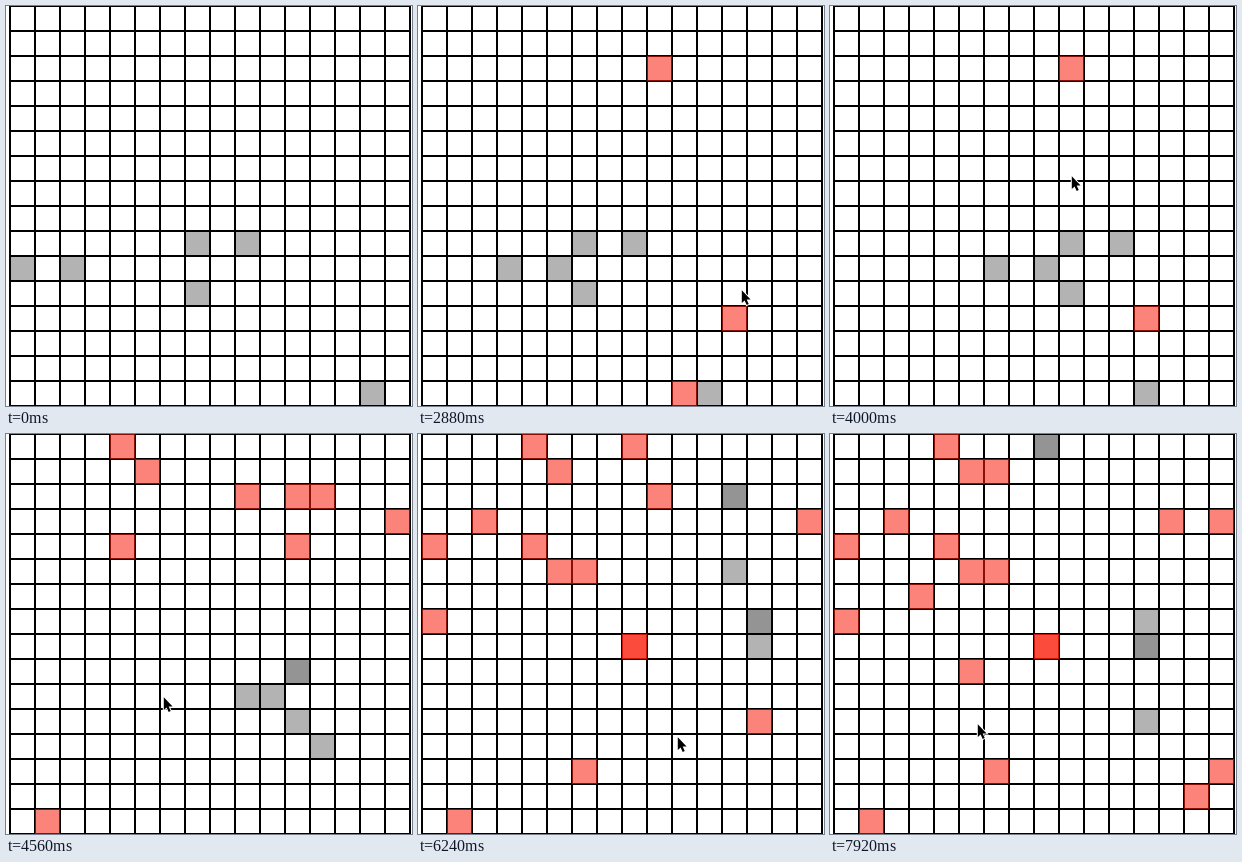
Write an HTML page that moves like this. It is 406 by 400 pixels and loops after 7.99 s.

```html
<!DOCTYPE html>
<html lang="en">
<head>
<meta charset="utf-8">
<title>Foraging grid</title>
<style>
  html, body { margin: 0; width: 100%; height: 100%; overflow: hidden; background: #fff; }
  svg { display: block; }
</style>
</head>
<body>
<svg width="406" height="400" viewBox="0 0 406 400">
  <g shape-rendering="crispEdges">
    <g id="walkers" fill="#808080" fill-opacity=".6"></g>
    <path id="grid" stroke="#000" stroke-width="2"/>
    <g id="food" fill="#fa1e0b" fill-opacity=".55"></g>
  </g>
  <g id="ring" fill="none">
    <circle cx="329.5" cy="313.8" r="21.3" stroke="#fff" stroke-width="4"/>
    <circle cx="329.5" cy="313.8" r="21.3" stroke="#000" stroke-width="1.5"/>
  </g>
  <path id="cursor" d="M.8 1.2V14L3.6 11.4L5.7 16L7.7 15.1L5.7 10.6H9.6Z" stroke="#fff" stroke-width="2" paint-order="stroke"/>
</svg>
<script>
const LOOP = 7990, FRAME = 70, SIZE = 25, LEFT = 4, COUNT = 16;
const TICK = 298, FIRST = 1950;
const $ = id => document.getElementById(id);

// Routes are goals "x,y@tick"; a walker goes sideways first, then up or down.
const upper = '11,9@8 11,2@13.5 12,2@14 8,2@18 8,0@20';
const middle = '11,8@11 13,8@13 13,7@14 14,8@16 12,8@18';
const routes = [
  '7,9@0 5,9@2 ' + upper,
  '9,9@0 7,9@2 11,9@6 ' + upper,
  '2,10@0 11,10@9 ' + middle,
  '7,11@0 5,11@2 11,11@8 ' + middle,
  '0,10@0 6,10@6 11,10@9 11,7@11 12,5@14 12,9@18 12,7@20',
  '14,15@0 10,15@4 12,15@6 12,12@8 11,12@9 11,9@11 13,8@14 13,11@17 12,11@18'
];

// Food dropped at each tick; it lasts until a walker reaches its cell.
const drops = {
  0: '5,9 9,2 12,12 10,15',
  7: '4,0 5,1 11,2 12,2',
  8: '4,4 11,4 15,3 1,15',
  11: '8,0 0,4 5,5',
  13: '6,5 6,13 8,8',
  14: '2,3 0,7 8,8 13,11',
  16: '3,6 13,3',
  18: '14,14',
  19: '6,1 5,9 15,13'
};

// Pointer stops: time, x, y.
const stops = [
  [1410, 369, 330], [1690, 330, 313], [2320, 330, 313], [2880, 323, 283],
  [3650, 255, 149], [4000, 241, 169], [4900, 117, 306], [5260, 147, 277],
  [6240, 259, 302], [6590, 248, 326], [7920, 147, 289]
];

const show = (el, on) => el.setAttribute('visibility', on ? 'visible' : 'hidden');

function place(el, { x, y }) {
  el.setAttribute('x', LEFT + x * SIZE);
  el.setAttribute('y', y * SIZE);
}

function makeCell(parent, at) {
  const el = document.createElementNS('http://www.w3.org/2000/svg', 'rect');
  el.setAttribute('width', SIZE);
  el.setAttribute('height', SIZE);
  $(parent).append(el);
  place(el, at);
  return el;
}

// Every cell on a route with the tick at which it is entered.
function trace(route) {
  const [first, ...goals] = route.split(' ').map(g => g.split(/[,@]/).map(Number));
  let [x, y, from] = first;
  const path = [{ x, y, tick: from }];
  for (const [gx, gy, to] of goals) {
    const n = Math.abs(gx - x) + Math.abs(gy - y);
    for (let k = 1; k <= n; k++) {
      if (x !== gx) x += Math.sign(gx - x);
      else y += Math.sign(gy - y);
      path.push({ x, y, tick: Math.ceil(from + (to - from) * k / n - 1e-6) });
    }
    from = to;
  }
  return path;
}

const walkers = routes.map(trace).map(path => ({ path, el: makeCell('walkers', path[0]) }));
const visits = walkers.flatMap(w => w.path);

const food = Object.entries(drops).flatMap(([tick, cells]) => cells.split(' ').map(cell => {
  const [x, y] = cell.split(',').map(Number);
  const eaten = visits.filter(v => v.x === x && v.y === y && v.tick > tick).map(v => v.tick);
  return { from: +tick, to: Math.min(...eaten), el: makeCell('food', { x, y }) };
}));

let lines = '';
for (let i = 0; i <= COUNT; i++) {
  lines += `M${LEFT + i * SIZE} 0V400M3 ${i * SIZE}H405`;
}
$('grid').setAttribute('d', lines);

function pointerAt(t) {
  if (t < stops[0][0]) return [340, 392];
  const i = stops.findIndex(s => s[0] > t);
  if (i < 0) return stops[stops.length - 1].slice(1);
  const [t0, x0, y0] = stops[i - 1], [t1, x1, y1] = stops[i];
  const p = (t - t0) / (t1 - t0), k = p * p * (3 - 2 * p);
  return [x0 + (x1 - x0) * k, y0 + (y1 - y0) * k];
}

function draw(time) {
  const t = 10 + FRAME * Math.floor((time - 10) / FRAME);
  const tick = Math.floor((t - FIRST) / TICK);
  for (const { path, el } of walkers) {
    place(el, path.filter(c => c.tick <= Math.max(tick, 0)).pop());
  }
  food.forEach(f => show(f.el, tick >= f.from && tick < f.to));
  show($('ring'), t >= 1760 && t < 1900);
  show($('cursor'), t >= 1410 || (t >= 500 && t < 570));
  $('cursor').setAttribute('transform', `translate(${pointerAt(t).map(Math.round)})`);
}

const start = performance.now();
function loop() {
  draw((performance.now() - start) % LOOP);
  requestAnimationFrame(loop);
}
loop();
</script>
</body>
</html>
```
